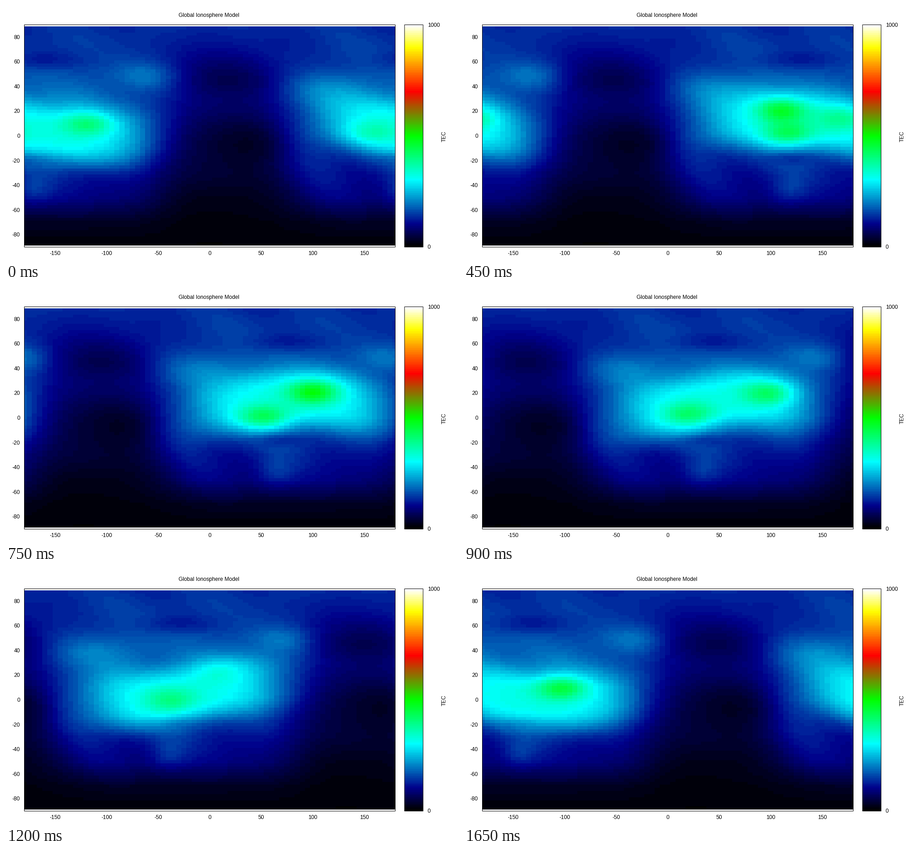
A matplotlib script that plays this animation: 998 px wide and 561 px high, repeating every 1800 ms.

```python
import numpy as np
import matplotlib.pyplot as plt
from matplotlib.animation import FuncAnimation
from matplotlib.colors import LinearSegmentedColormap
from matplotlib.patches import Rectangle

W, H, DPI = 998, 561, 100
FRAMES, INTERVAL = 12, 150
LEFT, RIGHT, TOP, BOTTOM = 40.5, 859.5, 41.5, 532.5
BAR_LEFT = RIGHT + .025 * (RIGHT - LEFT)
BAR_RIGHT = BAR_LEFT + .05 * (RIGHT - LEFT)

PALETTE = [(0, "black"), (.1, "#00008b"), (.3, "cyan"), (.5, "#00ff00"),
           (.7, "red"), (.9, "yellow"), (1, "white")]

# Content by latitude on either side of the terminator
LAT = [-88, -70, -50, -30, 0, 30, 60, 88]
NIGHT = [8, 11, 20, 42, 55, 85, 98, 132]
DAY = [8, 30, 95, 125, 185, 185, 152, 138]

# Patches that travel with the sun: offset, lat, half-width, half-height, value
PATCHES = [
    (-75, 38, 35, 10, 200),    # morning crest
    (90, 48, 25, 10, 195),     # evening crest
    (-5, 62, 30, 6, 122),      # polar dip at noon
    (-12, -18, 20, 5, 110),    # trough south of the bulge
    (-15, -42, 15, 10, 145),   # southern spot
    (175, 45, 30, 12, 62),     # northern night
    (-165, -6, 30, 16, 30),    # equatorial night
]

# Peak paths: hour, lon, lat, gain
MAIN_PEAK = [(0, 157, 3, 60), (4, 147, 5, 100), (8, 86, -2, 170),
             (12, 20, 3, 110), (16, -38, 0, 85), (22, -103, 10, 150),
             (24, -118, 10, 110), (28, -170, 16, 90), (32, -212, 12, 75),
             (34, -235, 12, 0)]
NORTH_PEAK = [(2, 130, 19, 0), (4, 118, 19, 80), (8, 103, 22, 230),
              (12, 98, 20, 130), (14, 50, 22, 0), (17, -12, 25, 50),
              (20, -40, 25, 0)]

lon, lat = np.meshgrid(np.linspace(-180, 180, 73), np.linspace(-87.5, 87.5, 71))
magnetic = 7.5 + 8.5 * np.cos(np.radians(lon - 85))
night, day = (np.interp(lat, LAT, p) for p in (NIGHT, DAY))

rng = np.random.default_rng(7)
WAVES = list(zip(rng.integers(1, 5, 6), rng.uniform(2, 6, 6),
                 rng.uniform(0, 2 * np.pi, 6)))


def offset(centre):
    return (lon - centre + 180) % 360 - 180


def soft(dx, dy, rx, ry, power=2.5):
    """Rounded mask that is one half at the given radii."""
    return 0.5 ** (abs(dx / rx) ** power + abs(dy / ry) ** power)


def bulge_lon(hour):
    """Centre of the day side: one turn west per day, slightly uneven."""
    return -146 - 15 * hour + 14 * np.cos(np.radians(15 * (hour - 10)))


def peak(path, hour):
    hours, xs, ys, gains = zip(*path)
    gain = np.interp(hour, hours, gains, left=0, right=0)
    x, y = np.interp(hour, hours, xs), np.interp(hour, hours, ys)
    return gain * soft(offset(x), lat - y, 20, 8, 2)


def tec_at(hour):
    sun = bulge_lon(hour)
    tec = night + (day - night) * soft(offset(sun - 8), 0, 115, 1, 5)
    for x, y, rx, ry, value in PATCHES:
        tec += (value - tec) * soft(offset(sun + x), lat - y, rx, ry, 2)
    for kx, ky, phase in WAVES:
        angle = kx * offset(sun) + ky * lat
        tec *= 1 + .03 * np.cos(np.radians(angle) + phase)
    tec += (318 - tec) * soft(offset(sun), lat - magnetic, 78, 20.5, 3)
    for start in (0, 24):
        for path in (MAIN_PEAK, NORTH_PEAK):
            tec += peak(path, hour + start)
    return tec


def px(lon_deg):
    return (LEFT + RIGHT) / 2 + lon_deg * (RIGHT - LEFT) / 360


def py(lat_deg):
    return (TOP + BOTTOM) / 2 - lat_deg * (BOTTOM - TOP) / 180


def box(x0, x1):
    return ax.add_patch(Rectangle((x0, TOP), x1 - x0, BOTTOM - TOP, fill=False,
                                  ec="black", lw=72 / DPI, snap=False, zorder=3))


def label(x, y, text, ha="center", **kw):
    ax.text(x, y, text, ha=ha, va="baseline", fontsize=12 * 72 / DPI,
            color="black", **kw)


plt.rcParams["font.family"] = "Liberation Sans"
cmap = LinearSegmentedColormap.from_list("tec", PALETTE, N=128)
fig = plt.figure(figsize=(W / DPI, H / DPI), dpi=DPI, facecolor="white")
ax = fig.add_axes([0, 0, 1, 1])
ax.axis("off")

style = dict(cmap=cmap, origin="lower", aspect="auto", interpolation="nearest")
maps = [tec_at(24 * i / FRAMES) for i in range(FRAMES)]
image = ax.imshow(maps[0], vmin=0, vmax=1000, **style,
                  extent=(px(-182.5), px(182.5), py(-88.7), py(88.7)))
ax.imshow(np.arange(128)[:, None], **style,
          extent=(BAR_LEFT, BAR_RIGHT, BOTTOM, TOP))
ax.set_xlim(0, W)
ax.set_ylim(H, 0)
image.set_clip_path(box(LEFT, RIGHT))
box(BAR_LEFT, BAR_RIGHT)

label(448.5, 24, "Global Ionosphere Model")
for v in range(-150, 151, 50):
    label(px(v), 550, str(v))
for v in range(-80, 81, 20):
    label(31, py(v) + 4, str(v), ha="right")
label(931, TOP + 4, "1000", ha="left")
label(931, BOTTOM + 4, "0", ha="left")
label(971, 288, "TEC", rotation=90, rotation_mode="anchor")


def update(i):
    image.set_data(maps[i])
    return [image]


anim = FuncAnimation(fig, update, frames=FRAMES, interval=INTERVAL,
                     repeat=True, repeat_delay=0)
plt.show()
```
